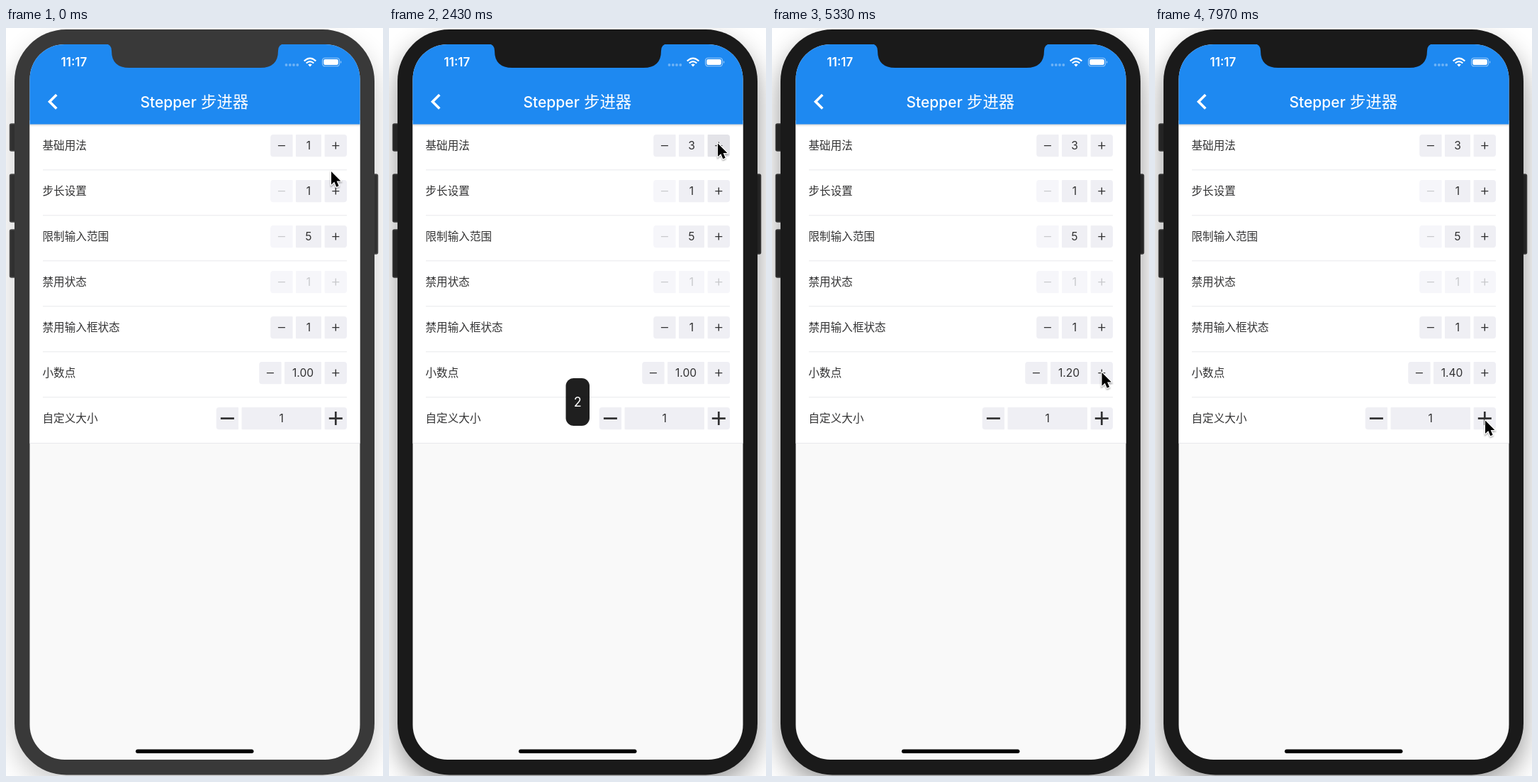
An HTML page for the animation above (8000 ms loop, 532 by 1053 pixels).

```html
<!DOCTYPE html>
<html lang="zh-CN">
<head>
<meta charset="utf-8">
<title>Stepper</title>
<style>
html, body { margin: 0; width: 100%; height: 100%; overflow: hidden; background: #fff; }
svg { display: block; }
text { font-family: Inter, "Noto Sans CJK SC", "Noto Sans CJK", sans-serif; }
.label { font-size: 15.6px; fill: #323233; }
.value { font-size: 15.6px; fill: #323233; text-anchor: middle; }
.tile { fill: #efeff4; }
.icon { stroke: #323233; fill: none; }
.off .tile { fill: #f6f6fa; }
.off .icon { stroke: #c8c9cc; }
.off .value { fill: #c8c9cc; }
.toast text { font-size: 18px; fill: #fff; text-anchor: middle; }
</style>
</head>
<body>
<svg width="532" height="1053" viewBox="0 0 532 1053">
  <defs>
    <clipPath id="screen"><rect x="33.5" y="23" width="466" height="1007" rx="49"/></clipPath>
    <filter id="wide" x="-20%" y="-20%" width="140%" height="140%"><feGaussianBlur stdDeviation="19"/></filter>
    <filter id="soft" x="-50%" y="-50%" width="200%" height="200%"><feGaussianBlur stdDeviation="1.3"/></filter>
    <linearGradient id="fall" x2="0" y2="1"><stop stop-opacity=".18"/><stop offset="1" stop-opacity="0"/></linearGradient>
    <path id="arrow" d="M0 0V18.6L4.3 14.6L7.3 21.7L10.6 20.3L7.6 13.4H13.4Z"/>
  </defs>

  <rect id="shadow" x="12" y="22" width="508" height="1042" rx="72" filter="url(#wide)"/>
  <g id="keys" stroke-width="1.5">
    <rect x="5.5" y="135" width="12" height="38" rx="2"/>
    <rect x="5.5" y="206" width="12" height="67" rx="2"/>
    <rect x="5.5" y="284" width="12" height="67" rx="2"/>
    <rect x="512" y="206" width="12.5" height="112" rx="2"/>
  </g>
  <rect id="body" x="12" y="2" width="508" height="1049.5" rx="73"/>

  <g clip-path="url(#screen)">
    <rect x="33" y="22" width="468" height="1010" fill="#f9f9f9"/>
    <rect x="33" y="130" width="468" height="454" fill="#fff"/>
    <rect x="33" y="135" width="468" height="4" fill="url(#fall)"/>
    <rect x="33" y="22" width="468" height="113.5" fill="#1e89f1"/>
    <path d="M33 584.5H501" stroke="#e8e9ec"/>
    <g id="rows"></g>
  </g>
  <path id="notch" d="M140 22Q149 23 149 32Q149 56 174 56H359Q384 56 384 32Q384 23 393 22Z"/>

  <g fill="#fff">
    <text x="77.5" y="54" font-size="17" font-weight="600">11:17</text>
    <g opacity=".35">
      <circle cx="395.5" cy="52" r="1.9"/><circle cx="400.8" cy="52" r="1.9"/>
      <circle cx="406" cy="52" r="1.9"/><circle cx="411.3" cy="52" r="1.9"/>
    </g>
    <path d="M429 54.5L426.2 51.6Q429 49.2 431.8 51.6Z"/>
    <g fill="none" stroke="#fff" stroke-width="2.1">
      <path d="M420.7 46.6Q429 38.6 437.3 46.6M423.7 49.6Q429 44.6 434.3 49.6"/>
      <rect x="446.5" y="42.2" width="24" height="11.6" rx="3.6" stroke-width="1.1" opacity=".55"/>
      <path d="M71.3 94L61.5 103.8L71.3 113.6" stroke-width="3.6"/>
    </g>
    <rect x="448.2" y="43.9" width="20.6" height="8.2" rx="2"/>
    <path d="M472 46Q474.6 48 472 50Z" opacity=".55"/>
    <text x="189.5" y="112" font-size="21" font-weight="500">Stepper</text>
    <text x="275" y="112" font-size="22.4" font-weight="500">步进器</text>
  </g>
  <rect x="183" y="1015.5" width="166.5" height="5.5" rx="2.75"/>

  <g class="toast" opacity="0"><rect x="249.5" y="493" width="33.5" height="67" rx="11" fill-opacity=".88"/><text x="266.3" y="533">2</text></g>
  <g class="toast" opacity="0"><rect x="249.5" y="493" width="33.5" height="67" rx="11" fill-opacity=".88"/><text x="266.3" y="533">3</text></g>

  <g id="pointer">
    <use href="#arrow" y="1.5" opacity=".4" stroke="#000" stroke-width="2" filter="url(#soft)"/>
    <use href="#arrow" stroke="#fff" stroke-width="2.6" stroke-linejoin="round"/>
    <use href="#arrow"/>
  </g>
</svg>

<script>
const LOOP = 8000;
const $ = s => document.querySelector(s);

// label, value, disabled parts (m = minus, v = value, p = plus), value width, icon size, icon weight
const rows = [
  ['基础用法', '1', ''],
  ['步长设置', '1', 'm'],
  ['限制输入范围', '5', 'm'],
  ['禁用状态', '1', 'mvp'],
  ['禁用输入框状态', '1', ''],
  ['小数点', '1.00', '', 52],
  ['自定义大小', '1', '', 112.5, 19, 2.7],
];

function tile(x, y, w, part, off, content) {
  const r = 4, h = 31.4;
  const l = part === 'm' ? r : 1, e = part === 'p' ? r : 1;
  const d = `M${x + l} ${y}h${w - l - e}q${e} 0 ${e} ${e}v${h - 2 * e}q0 ${e} ${-e} ${e}` +
    `h${l + e - w}q${-l} 0 ${-l} ${-l}v${2 * l - h}q0 ${-l} ${l} ${-l}z`;
  return `<g class="${part}${off.includes(part) ? ' off' : ''}"><path class="tile" d="${d}"/>${content}</g>`;
}

function row([label, value, off, w = 36, size = 10, weight = 1.4], i) {
  const mid = 165.6 + 64 * i, top = mid - 15.7, half = size / 2;
  const vx = 445 - w, mx = vx - 35.8, px = 449.6;
  const dash = x => `M${x + 15.7 - half} ${mid}h${size}`;
  const bar = `M${px + 15.7} ${mid - half}v${size}`;
  const icon = d => `<path class="icon" stroke-width="${weight}" d="${d}"/>`;
  return `<g><text class="label" x="51.5" y="${mid + 5.8}">${label}</text>` +
    (i < 6 ? `<path d="M52 ${mid + 34.2}H481" stroke="#e8e9ec"/>` : '') +
    tile(mx, top, 31.4, 'm', off, icon(dash(mx))) +
    tile(vx, top, w, 'v', off, `<text class="value" x="${vx + w / 2}" y="${mid + 5.7}">${value}</text>`) +
    tile(px, top, 31.4, 'p', off, icon(dash(px) + bar)) + '</g>';
}

$('#rows').innerHTML = rows.map(row).join('');
const values = document.querySelectorAll('#rows .value');
const plus = document.querySelectorAll('#rows .p .tile');
const toasts = document.querySelectorAll('.toast');

// time, x, y
const path = [
  [0, 459, 202], [800, 464, 166], [1750, 464, 166], [2150, 464, 162.5],
  [3470, 464, 162.5], [4100, 454.5, 411.5], [4280, 455, 412], [4450, 477, 446],
  [4650, 465.5, 482], [5000, 465.5, 484.5], [5800, 465.5, 486], [6000, 465.5, 486],
  [6500, 472.5, 430], [6600, 472.5, 430], [7300, 466, 552], [7600, 466, 554], [7970, 466, 552.5],
];

const clamp = v => Math.max(0, Math.min(1, v));
const ease = v => (v = clamp(v), v * v * (3 - 2 * v));
const within = (t, a, b) => t >= a && t < b;

function pointerAt(t) {
  const i = path.findIndex(p => p[0] > t);
  if (i < 0) return path[path.length - 1].slice(1);
  const [t0, x0, y0] = path[i - 1], [t1, x1, y1] = path[i];
  const k = ease((t - t0) / (t1 - t0));
  return [x0 + (x1 - x0) * k, y0 + (y1 - y0) * k];
}

function fade(t, start, end) {
  return ease((t - start) / 190) * (1 - ease((t - end) / 200));
}

function draw(t) {
  const focused = t >= 900;
  const shell = focused ? '#1a1a1a' : '#393939';
  $('#body').setAttribute('fill', shell);
  $('#notch').setAttribute('fill', shell);
  $('#keys').setAttribute('fill', focused ? '#242424' : '#303030');
  $('#keys').setAttribute('stroke', focused ? '#383838' : '#4a4a4a');
  $('#shadow').setAttribute('opacity', focused ? .42 : .22);

  values[0].textContent = t < 1200 ? '1' : t < 2430 ? '2' : '3';
  values[5].textContent = t < 4720 ? '1.00' : t < 5800 ? '1.20' : '1.40';
  const pressed = [
    within(t, 1130, 1450) || within(t, 2350, 2530), , , , ,
    within(t, 4660, 4810) || within(t, 5740, 5900),
  ];
  plus.forEach((p, i) => p.style.fill = pressed[i] ? '#e3e3e8' : '');

  toasts[0].setAttribute('opacity', fade(t, 1200, 2430));
  toasts[1].setAttribute('opacity', fade(t, 2430, 3850));
  $('#pointer').setAttribute('transform', `translate(${pointerAt(t)})`);
}

const began = performance.now();
function tick() {
  draw((performance.now() - began) % LOOP);
  requestAnimationFrame(tick);
}
tick();
</script>
</body>
</html>
```
